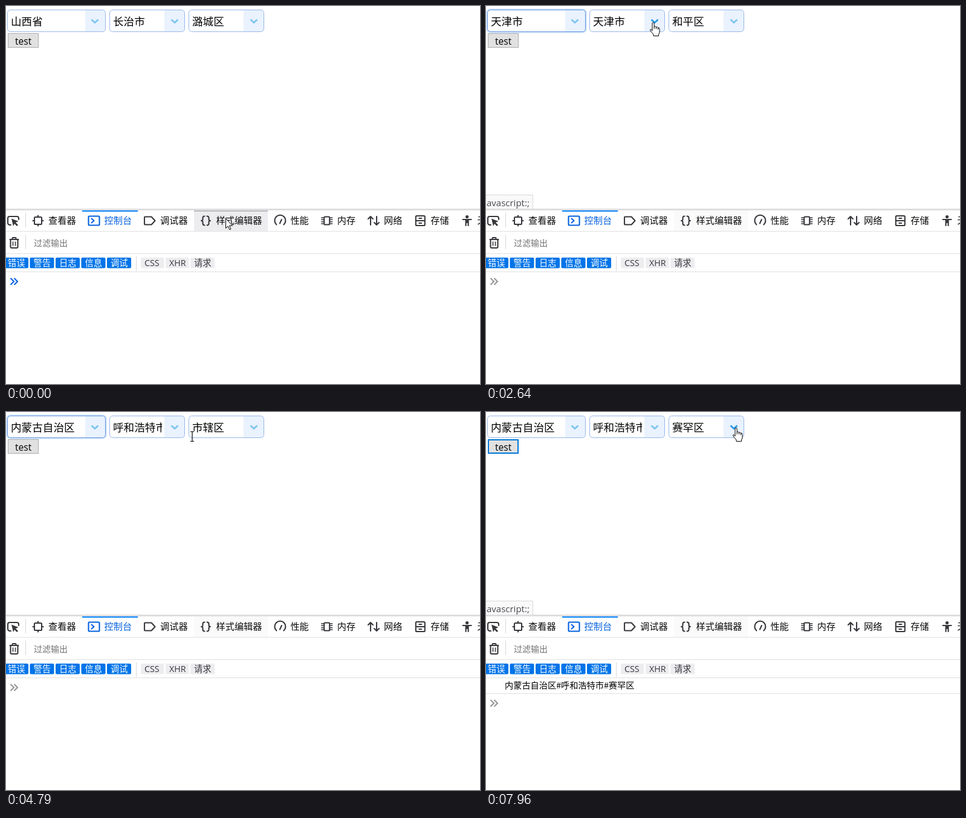
An HTML page for the animation above (8000 ms loop, 784 by 625 pixels).

```html
<!DOCTYPE html>
<html lang="zh-CN">
<head>
<meta charset="utf-8">
<title>Region picker</title>
<style>
html, body { margin: 0; width: 100%; height: 100%; overflow: hidden; background: #fff; }
body > svg { display: block; width: 784px; height: 625px; }
text { font-family: "Noto Sans CJK SC", "Noto Sans CJK", "Noto Sans", sans-serif; white-space: pre; }
.latin { font-family: "Open Sans", "Noto Sans", sans-serif; }
.icon { fill: none; stroke: #38383d; stroke-width: 2.1; stroke-linejoin: round; stroke-linecap: round; }
.blue { stroke: #0060df; }
.thin { stroke-width: 1.6; }
</style>
</head>
<body>
<svg viewBox="0 0 784 625">
  <g id="live"></g>
  <g id="tools"></g>
  <g id="pointer"></g>
</svg>
<script>
const LOOP = 8000, STEP = 73, ROW = 40;

const rect = (x, y, w, h, fill, more = '') =>
  `<rect x="${x}" y="${y}" width="${w}" height="${h}" fill="${fill}" ${more}/>`;
const text = (x, y, s, size, fill = '#000', cls = '') =>
  `<text x="${x}" y="${y}" font-size="${size}" fill="${fill}" class="${cls}">${s}</text>`;
const path = (d, more) => `<path d="${d}" ${more}/>`;
const line = (d, cls = '') => path(d, `class="icon ${cls}"`);
const frame = (w, h, cls = '') => rect(-w / 2, -h / 2, w, h, 'none', `rx="1.500" class="icon ${cls}"`);
const place = (x, y, s) => `<g transform="translate(${x} ${y})">${s}</g>`;
const turned = (s, angles) => angles.map(a => `<g transform="rotate(${a})">${s}</g>`).join('');

// ---- tool panel: icons are centred on 0,0 ----
const brace = line('M-2-7.500q-3 0-3 3v2Q-5 0-7.500 0q2.500 0 2.500 2.500v2q0 3 3 3');
const arrow = line('M-5 7V-7M-9-3l4-4 4 4');
const pin = line('M5.500 0h3.500', 'thin');
const tabs = [
  ['查看器', frame(12, 12) + turned(line('M0-6.500v-2'), [0, 90, 180, 270])],
  ['控制台', frame(18, 15, 'blue') + line('M-4-3.500L0 0-4 3.500', 'blue')],
  ['调试器', line('M-8-6.500H2.500L8.500 0 2.500 6.500H-8q-1 0-1-1v-11q0-1 1-1z')],
  ['样式编辑器', turned(brace, [0, 180])],
  ['性能', line('M-6 6.500A9 9 0 1 1 6 6.500M-.500 4.500L2.500-2')],
  ['内存', frame(9, 13) + [-5, -1.7, 1.7, 5].map(y => place(0, y, turned(pin, [0, 180]))).join('')],
  ['网络', turned(arrow, [0, 180])],
  ['存储', frame(15, 16) + line('M-7 0H7M-2-4H2M-2 4H2')],
  ['无障碍', '<circle cy="-6.500" r="2.600" fill="#38383d"/>' + line('M-7-2H7M-2-2V8M2-2V8M0-2V3')]
];
const chips = ['错误', '警告', '日志', '信息', '调试', 'CSS', 'XHR', '请求'];

function tabRow() {
  let s = '', x = 70;
  tabs.forEach(([label, icon], i) => {
    s += place(x - 17, 355, icon) + text(x, 360.3, label, 15.2, i === 1 ? '#0060df' : '#0c0c0d');
    x += label.length * 15.2 + 46.9;
  });
  return s;
}

function chipRow() {
  let s = '', x = -3;
  chips.forEach((label, i) => {
    const on = i < 5, latin = label.length === 3, w = latin ? 38.5 : 40;
    s += rect(x, 416, w, 17.5, on ? '#0074e8' : '#ededf0', 'rx="2"') +
      text(x + 6, 430, label, 14.3, on ? '#fff' : '#38383d', latin ? 'latin' : '');
    x += w + (i === 4 ? 16 : 2.5);
  });
  return s;
}

function panel() {
  let s = rect(0, 335, 784, 3, '#dedee0') + rect(126, 338, 92, 2, '#0a84ff');
  for (const y of [372, 409, 439]) s += rect(0, y, 784, 1, '#e0e0e2');
  for (const [x, y] of [[32, 342], [32, 378], [215, 414]]) s += rect(x, y, 1, 24, '#d7d7db');
  s += place(12, 355, line('M-4 7q-5 0-5-3v-8q0-3 3-3H6q3 0 3 3v2') +
    path('M-3-3.500L8.500 1 4 3l4 4-2 2-4-4-2 4z', 'fill="#38383d"'));
  s += place(13.5, 391, line('M-7-5H7M-3-5v-2q0-1 1-1h4q1 0 1 1v2M-6-4V7q0 2 2 2H4q2 0 2-2V-4') +
    line('M-2-1V5M2-1V5', 'thin'));
  return s + tabRow() + text(46, 397, '过滤输出', 14, '#737373') + chipRow();
}

// ---- story ----
const boxes = [{ x: 2, w: 163 }, { x: 171, w: 125 }, { x: 302, w: 125 }];
const lists = [
  ['北京市', '天津市', '河北省', '山西省', '内蒙古自治区', '辽宁省'],
  ['天津市'],
  ['市辖区', '新城区', '回民区', '玉泉区', '赛罕区', '土默特左旗']
];
const first = ['山西省', '长治市', '潞城区'];
const visits = [
  { box: 0, over: 663, open: 875, pick: 1665, result: ['天津市', '天津市', '和平区'] },
  { box: 1, over: 2430, open: 2715, pick: 3670 },
  { box: 0, over: 3600, open: 3670, pick: 4260, result: ['内蒙古自治区', '呼和浩特市', '市辖区'] },
  { box: 2, over: 5310, open: 5450, pick: 5815, result: ['内蒙古自治区', '呼和浩特市', '赛罕区'] },
  { box: 2, over: 7820, open: LOOP, pick: LOOP }
];
const PRESS = 6705, LOG = 6780;

// pointer moves: start, end, x, y
const moves = [[60, 430, 150, 64], [590, 735, 147, 28], [950, 1390, 113, 90], [1450, 1597, 106, 108],
  [1990, 2280, 251, 26], [2430, 2575, 276, 27], [2794, 3230, 160, 22], [3310, 3460, 160, 26],
  [3674, 4192, 109, 217], [4420, 4790, 308, 41], [4863, 5160, 416, 22], [5456, 5748, 367, 208],
  [5821, 6040, 315, 157], [6120, 6550, 35, 53], [6990, 7212, 90, 69], [7285, 7740, 405, 22],
  [7820, 7960, 413, 26]];

function pointerAt(t) {
  let x = 363, y = 351;
  for (const [from, to, nx, ny] of moves) {
    if (t < from) break;
    const n = Math.round((to - from) / STEP) + 1;
    const k = Math.min(1, (1 + Math.floor((t - from) / (to - from) * (n - 1) + 0.15)) / n);
    x += (nx - x) * k;
    y += (ny - y) * k;
  }
  return { x, y };
}

// ---- page ----
function select(i, value, focused, hot) {
  const { x, w } = boxes[i], r = x + w, cx = r - (i ? 17 : 18);
  let s = '';
  if (focused) s += rect(x - 0.5, 5.5, w + 1, 38, 'none', 'rx="6" stroke="#5b9bf0" stroke-opacity=".28" stroke-width="2.500"');
  s += path(`M${r - 34} 7h28q5 0 5 5v25q0 5-5 5h-28z`, 'fill="#e9f2fe"');
  s += rect(x + 0.5, 6.5, w - 1, 36, 'none', `rx="5" stroke="${focused ? '#5f95e0' : '#97b6ea'}"`);
  s += path(`M${cx - 5.5} 22.500l5.500 5 5.500-5`, `fill="none" stroke="${hot ? '#2496e3' : '#7cc3f0'}" stroke-width="2.600"`);
  return s + `<svg x="${x}" y="7" width="${w - 38}" height="35">${text(6, 25, value, 17.6)}</svg>`;
}

function list(i, chosen, p) {
  const { x, w } = boxes[i], rows = lists[i], long = rows.length > 1;
  const inner = long ? w - 22 : w - 2, bx = x + w - 21;
  let s = rect(x + 0.5, 44.5, w - 1, long ? 251 : 41, '#fff', 'stroke="#97b6ea"');
  rows.forEach((label, k) => {
    const y = 45 + ROW * k, on = label === chosen;
    const over = p.x > x && p.x < x + inner && p.y >= y && p.y < y + ROW;
    if (on || over) s += rect(x + 1, y, inner, ROW, on ? '#ffe38d' : '#e9f1fe');
    s += text(x + 6, y + 27, label, 17.6);
  });
  if (long) {
    s += rect(bx, 45, 20, 250, '#f0f0f0') + rect(bx, 66, 19, i ? 82 : 34, '#cdcdcd');
    s += path(`M${bx + 5.5} 58l4-4 4 4M${bx + 5.5} 282l4 4 4-4`, 'fill="none" stroke="#505050" stroke-width="1.900"');
  }
  return s;
}

function button(over, down, focused) {
  const fill = down ? '#cce4f7' : over ? '#e5f1fb' : '#e1e1e1';
  const edge = down ? '#005499' : over || focused ? '#0078d7' : '#adadad';
  const wide = focused && !over && !down ? 2 : 1;
  return rect(3 + wide / 2, 45 + wide / 2, 51 - wide, 24 - wide, fill, `stroke="${edge}" stroke-width="${wide}"`) +
    text(15, 63.5, 'test', 15.7, '#000', 'latin');
}

function status(t) {
  const v = visits.filter(v => t >= v.over).pop();
  if (!v) return '';
  const hide = Math.min(v.open + 600, v.pick);
  const seen = Math.min(1, (t - v.over) / 100, 1 - (t - hide) / 100);
  return seen <= 0 ? '' : `<g opacity="${seen}">` + rect(-1, 312.5, 78.5, 24, '#f9f9fa', 'stroke="#d9d9dc"') +
    text(1, 331, 'avascript:;', 15, '#4a4a4f', 'latin') + '</g>';
}

// ---- pointer shapes, hot spot at 0,0 ----
const shapes = {
  arrow: path('M.500.500V16.500L4.200 13 6.800 18.800 9 17.800 6.500 12.200H11.500Z', 'fill="#fff" stroke="#000"'),
  beam: path('M-3-8.500H3M0-8V7M-3 7.500H3', 'fill="none" stroke="#000" stroke-width="1.200"'),
  hand: path('M-1 14V2a1.600 1.600 0 0 1 3.200 0V7q2.500-1 3.200 1 2.500-1 3.200 1 2.400-.500 2.400 2v5q0 2-1.500 4v2.500H1V20Q-2 17-4.500 13-5-.500-1 14ZM2.200 7v4M5.400 8v3M8.600 9v3'.replace('-5-.500-1 14', '-4 9.500-1 14'),
    'fill="#fff" stroke="#000" stroke-linejoin="round"')
};

function pointerKind({ x, y }) {
  const box = y >= 6 && y <= 43 ? boxes.findIndex(b => x >= b.x && x <= b.x + b.w) : -1;
  if (box < 0) return { kind: 'arrow' };
  const hand = x >= boxes[box].x + boxes[box].w - 34;
  return hand ? { kind: 'hand', box } : { kind: 'beam' };
}

function page(t, p, hot) {
  const opened = visits.filter(v => t >= v.open).pop();
  const picked = visits.filter(v => v.result && t >= v.pick).pop();
  const values = picked ? picked.result : first;
  const focus = opened && t < PRESS ? opened.box : -1;
  const logged = t >= LOG, tabHot = t < 60;

  let s = rect(311, 338, 122, 34, tabHot ? '#ededf0' : '#fafafa');
  if (tabHot) s += rect(311, 338, 122, 2, '#bcbcc2');
  s += button(p.x >= 3 && p.x <= 54 && p.y >= 45 && p.y <= 69, t >= PRESS && !logged, t >= PRESS);
  values.forEach((v, i) => { s += select(i, v, focus === i, hot === i); });
  if (opened && t < opened.pick) s += list(opened.box, values[opened.box], pointerAt(t - STEP));

  if (logged) s += text(31, 457.3, '内蒙古自治区#呼和浩特市#赛罕区', 14.2) + rect(0, 465, 784, 1, '#e0e0e2');
  s += path(`M7.500 ${logged ? 476 : 450}l5.500 5.500-5.500 5.500m6-11l5.500 5.500-5.500 5.500`,
    `fill="none" stroke="${opened ? '#939395' : '#0060df'}" stroke-width="2"`);
  if (t >= 180 && t < 730) s += rect(32, 447, 1, 18, '#0c0c0d');
  return s + status(t);
}

const $ = id => document.getElementById(id);
$('tools').innerHTML = panel();
const start = performance.now();
let shown = '';

function draw() {
  const t = (performance.now() - start) % LOOP;
  const p = pointerAt(t), { kind, box } = pointerKind(p);
  const html = page(t, p, box);
  if (html !== shown) $('live').innerHTML = shown = html;
  $('pointer').innerHTML = place(p.x.toFixed(1), p.y.toFixed(1), shapes[kind]);
  requestAnimationFrame(draw);
}
draw();
</script>
</body>
</html>
```
